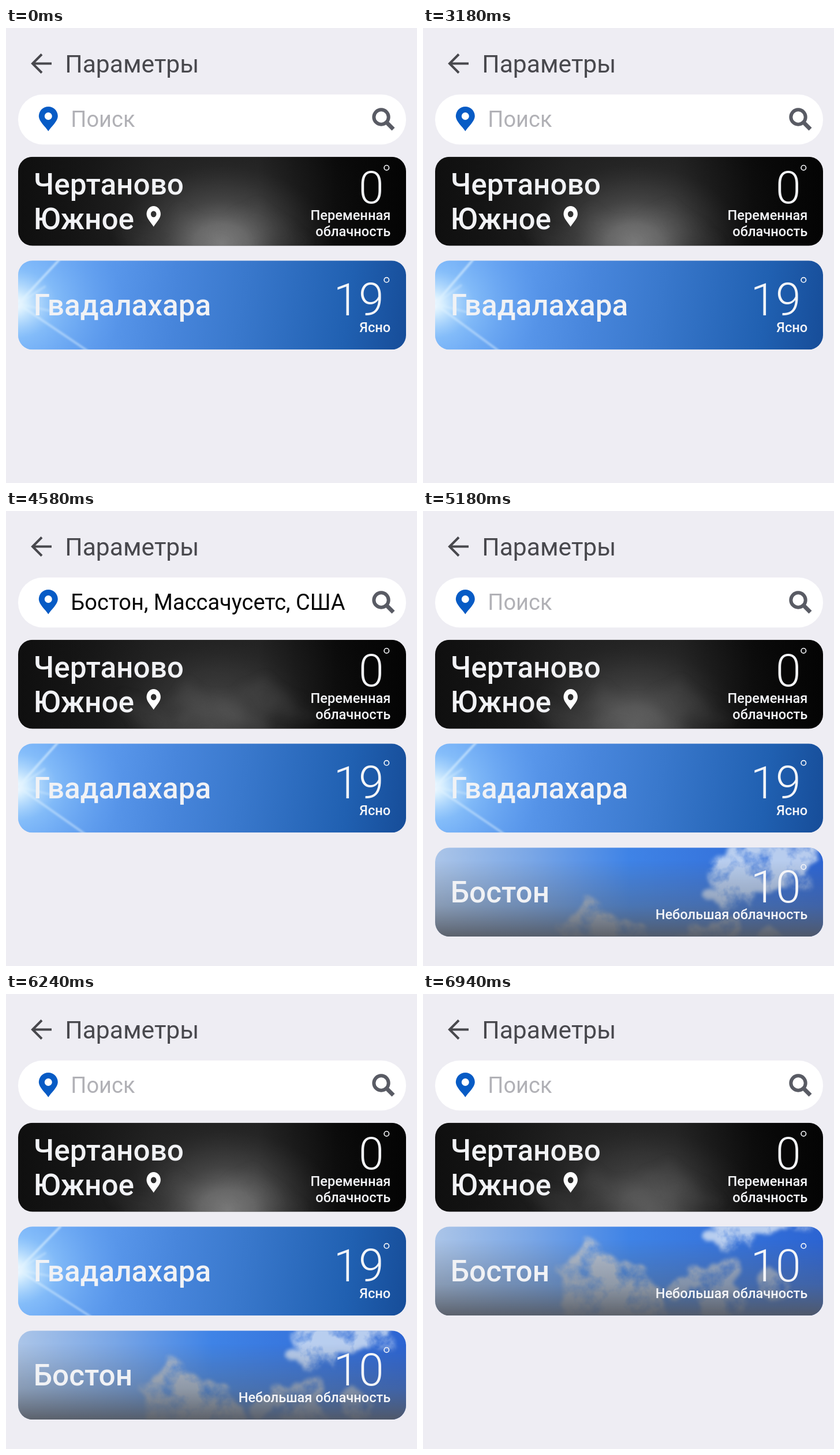
An HTML page that plays this animation: 712 by 787 pixels, repeating every 7000 ms.

```html
<!DOCTYPE html>
<html lang="ru">
<head>
<meta charset="utf-8">
<title>Параметры</title>
<style>
html, body { margin: 0; width: 100%; height: 100%; overflow: hidden; background: #eeedf3; }
svg { display: block; width: 100vw; height: 100vh; font-family: Roboto, "Noto Sans", sans-serif; }
.city { font-size: 51.2px; font-weight: 500; fill: #f1f2f5; }
.temp { font-size: 78.5px; font-weight: 300; fill: #f4f5f8; text-anchor: end; }
.sky { font-size: 23.6px; font-weight: 500; fill: #f4f5f8; text-anchor: end; }
.row { font-size: 32px; fill: #45454a; }
</style>
</head>
<body>
<svg viewBox="0 0 712 787" preserveAspectRatio="none">
  <defs>
    <clipPath id="cardClip"><rect width="672" height="154" rx="25"/></clipPath>
    <path id="pin" fill-rule="evenodd" d="M0 26C-5 18-16.5 9-16.5 0a16.5 16.5 0 0 1 33 0C16.5 9 5 18 0 26ZM0-6.5a6.5 6.5 0 1 0 0 13a6.5 6.5 0 1 0 0-13Z"/>
    <linearGradient id="night">
      <stop offset="0" stop-color="#0f0f0f"/><stop offset=".35" stop-color="#1d1d1d"/>
      <stop offset=".62" stop-color="#1e1e1e"/><stop offset=".82" stop-color="#0a0a0a"/><stop offset="1" stop-color="#040404"/>
    </linearGradient>
    <radialGradient id="moon">
      <stop offset="0" stop-color="#a0a0a0"/><stop offset=".25" stop-color="#8c8c8c" stop-opacity=".9"/>
      <stop offset=".55" stop-color="#6c6c6c" stop-opacity=".45"/><stop offset="1" stop-color="#444" stop-opacity="0"/>
    </radialGradient>
    <linearGradient id="day" gradientUnits="userSpaceOnUse" x1="0" y1="20" x2="672" y2="110">
      <stop offset="0" stop-color="#6eabf7"/><stop offset=".25" stop-color="#5896ea"/><stop offset=".4" stop-color="#4886dc"/>
      <stop offset=".58" stop-color="#3978cc"/><stop offset=".85" stop-color="#2060b1"/><stop offset="1" stop-color="#174e9a"/>
    </linearGradient>
    <radialGradient id="sun">
      <stop offset="0" stop-color="#fff"/><stop offset=".12" stop-color="#dff4ff" stop-opacity=".9"/>
      <stop offset=".4" stop-color="#a3d6ff" stop-opacity=".45"/><stop offset="1" stop-color="#70adf8" stop-opacity="0"/>
    </radialGradient>
    <linearGradient id="azure">
      <stop offset="0" stop-color="#abc5e8"/><stop offset=".25" stop-color="#79a6e6"/>
      <stop offset=".5" stop-color="#3f83e6"/><stop offset="1" stop-color="#2c64d2"/>
    </linearGradient>
    <linearGradient id="haze" x2="0" y2="1">
      <stop offset=".15" stop-color="#5a606b" stop-opacity="0"/><stop offset=".65" stop-color="#5a626e" stop-opacity=".42"/>
      <stop offset="1" stop-color="#53565d" stop-opacity=".9"/>
    </linearGradient>
    <filter id="fluff" filterUnits="userSpaceOnUse" x="150" y="-120" width="560" height="420" color-interpolation-filters="sRGB">
      <feTurbulence type="fractalNoise" baseFrequency=".024" numOctaves="5" seed="8" result="n"/>
      <feColorMatrix in="n" values="0 0 0 0 1  0 0 0 0 1  0 0 0 0 1  0 0 2.6 0 -.45" result="texture"/>
      <feDisplacementMap in="SourceGraphic" in2="n" scale="42" xChannelSelector="R" yChannelSelector="G"/>
      <feGaussianBlur stdDeviation="3"/>
      <feComposite in2="texture" operator="in"/>
    </filter>
    <filter id="smoke" filterUnits="userSpaceOnUse" x="100" y="0" width="500" height="230" color-interpolation-filters="sRGB">
      <feTurbulence type="fractalNoise" baseFrequency=".015 .03" numOctaves="3" seed="3" result="n"/>
      <feDisplacementMap in="SourceGraphic" in2="n" scale="90" xChannelSelector="R" yChannelSelector="G"/>
      <feGaussianBlur stdDeviation="9"/>
    </filter>
    <filter id="soft" filterUnits="userSpaceOnUse" x="-20" y="-20" width="240" height="200"><feGaussianBlur stdDeviation="1.5"/></filter>
  </defs>

  <rect width="712" height="787" fill="#eeedf3"/>
  <path d="M79 61.5H46M62 45.5L46 61.5L62 77.5" fill="none" stroke="#48484d" stroke-width="4"/>
  <text x="102.3" y="77" font-size="42.6" fill="#48484d">Параметры</text>

  <g id="cards">
    <g id="nightCard">
      <g clip-path="url(#cardClip)">
        <rect width="672" height="154" fill="url(#night)"/>
        <ellipse cx="350" cy="90" rx="270" ry="160" fill="url(#moon)" opacity=".16"/>
        <ellipse id="glow" cy="150" rx="190" ry="135" fill="url(#moon)"/>
        <g id="wisps" filter="url(#smoke)" fill="#777"></g>
      </g>
      <text class="city" x="26.8" y="65">Чертаново</text>
      <text class="city" x="26.8" y="125">Южное</text>
      <use href="#pin" fill="#fff" transform="translate(234.7 99.2) scale(.74 .84)"/>
    </g>
    <g id="sunCard">
      <g clip-path="url(#cardClip)">
        <rect width="672" height="154" fill="url(#day)"/>
        <ellipse cx="-8" cy="75" rx="190" ry="150" fill="url(#sun)"/>
        <g filter="url(#soft)"><g id="rays" stroke="#e2f3ff" stroke-linecap="round"></g></g>
      </g>
      <text class="city" x="26.8" y="95">Гвадалахара</text>
    </g>
    <g id="cloudCard">
      <g clip-path="url(#cardClip)">
        <rect width="672" height="154" fill="url(#azure)"/>
        <g id="drift"><g id="clouds" filter="url(#fluff)"></g></g>
        <rect width="672" height="154" fill="url(#haze)"/>
      </g>
      <text class="city" x="26.8" y="95">Бостон</text>
    </g>
  </g>

  <g id="panel">
    <rect x="21" y="115" width="672" height="700" rx="43" fill="#fff"/>
    <g id="rows"></g>
  </g>
  <rect x="21" y="115" width="672" height="86.5" rx="43" fill="#fff"/>
  <use href="#pin" fill="#075bc5" transform="translate(73.3 152.5)"/>
  <text id="field" x="112.3" y="171" font-size="38"></text>
  <g fill="none" stroke="#595b64">
    <circle cx="650" cy="154" r="12.7" stroke-width="6"/>
    <path d="M659 163L671 175" stroke-width="7"/>
  </g>
</svg>
<script>
const LOOP = 7000;
const $ = id => document.getElementById(id);

function add(parent, tag, attrs, text = '') {
  const el = document.createElementNS('http://www.w3.org/2000/svg', tag);
  for (const key in attrs) el.setAttribute(key, attrs[key]);
  el.textContent = text;
  parent.append(el);
  return el;
}

function weather(card, degrees, lines) {
  const y = lines.length > 1 ? 80.5 : 95;
  add(card, 'text', { class: 'temp', x: 633.5, y }, degrees);
  add(card, 'circle', { cx: 638.3, cy: y - 61.5, r: 4.2, fill: 'none', stroke: '#f4f5f8', 'stroke-width': 1.7 });
  lines.forEach((line, i) => add(card, 'text', { class: 'sky', x: 645.3, y: y + 29 + i * 28 }, line));
}

function puffs(opacity, fill, list) {
  const group = add($('clouds'), 'g', { opacity, fill });
  for (const [cx, cy, r] of list) add(group, 'circle', { cx, cy, r });
}

weather($('nightCard'), '0', ['Переменная', 'облачность']);
weather($('sunCard'), '19', ['Ясно']);
weather($('cloudCard'), '10', ['Небольшая облачность']);

puffs(.95, '#bcc4d0', [[264, 76, 24], [243, 102, 27], [288, 94, 28], [322, 114, 28], [354, 123, 24], [285, 150, 65], [350, 165, 45]]);
puffs(.85, '#b3bfd0', [[448, 111, 20], [480, 115, 22], [422, 133, 18], [508, 102, 20], [500, 155, 40], [585, 130, 24]]);
puffs(.85, '#d0def2', [[500, 5, 30], [508, 46, 22], [480, 50, 15], [540, 10, 34], [545, 44, 20], [585, 4, 34], [622, 0, 30], [560, -35, 50], [640, -30, 30]]);

for (let i = 0; i < 7; i++) {
  add($('wisps'), 'ellipse', { cx: 210 + i * 42, cy: 125 + 24 * Math.sin(i * 2.1), rx: 42, ry: 17, opacity: .35 });
}

// Each ray: angle in degrees, length, opacity
const rays = [[-47, 105, .6], [-33, 55, .3], [34, 150, .45], [12, 60, .3]].map(([angle, length, opacity]) => ({
  angle, el: add($('rays'), 'path', { d: `M0 0H${length}`, opacity, 'stroke-width': 4 })
}));

['Бостон, Массачусетс, США', 'Бостон, Линкольншир, Англия', 'Бостон, Джорджия, США', 'Бостон, Вирджиния, США', 'Бостон, Нью-Йорк, США']
  .forEach((name, i) => add($('rows'), 'text', { class: 'row', x: 113, y: 266 + i * 100 }, name));

const clamp = x => Math.min(1, Math.max(0, x));
const ease = (t, from, to) => {
  const x = clamp((t - from) / (to - from));
  return x * x * (3 - 2 * x);
};
const show = (el, on) => el.setAttribute('display', on ? 'inline' : 'none');

function place(el, y, scale = 1) {
  el.setAttribute('transform', `translate(357 ${y + 77}) scale(${scale}) translate(-336 -77)`);
}

function fieldText(t) {
  if (t < 3440 || t >= 4900) return '';
  if (t >= 4400) return 'Бостон, Массачусетс, США';
  return 'Бостон'.slice(0, 1 + Math.floor((t - 3440) / 140));
}

function render(t) {
  const query = fieldText(t);
  $('field').textContent = query || 'Поиск';
  $('field').setAttribute('fill', query ? '#050505' : '#b1b1b6');
  show($('panel'), t >= 3520 && t < 4400);
  show($('rows'), t >= 3700);

  const bright = .5 + .5 * Math.cos(t / 3000 * 2 * Math.PI);
  $('glow').setAttribute('cx', 352 + 18 * Math.sin(t / 900));
  $('glow').setAttribute('opacity', .25 + .45 * bright);
  $('wisps').setAttribute('transform', `translate(${12 * Math.sin(t / 600)} ${10 - 14 * (1 - bright)})`);
  $('wisps').setAttribute('opacity', .45 - .25 * bright);

  const sway = 2.5 * Math.sin(t / 1700);
  for (const ray of rays) {
    ray.el.setAttribute('transform', `translate(0 75) rotate(${ray.angle + Math.sign(ray.angle) * sway})`);
  }
  $('drift').setAttribute('transform', `translate(0 ${(6240 - t) * .037})`);

  place($('nightCard'), 222.7);
  place($('sunCard'), 402.3, 1 + .015 * ease(t, 6300, 6450));
  $('sunCard').setAttribute('opacity', 1 - ease(t, 6540, 6660));
  show($('sunCard'), t < 6660);

  place($('cloudCard'), 582.2 - 179.9 * ease(t, 6600, 6820));
  $('cloudCard').setAttribute('opacity', ease(t, 4900, 5050));
  show($('cloudCard'), t >= 4900);
}

const start = performance.now();
function tick() {
  render((performance.now() - start) % LOOP);
  requestAnimationFrame(tick);
}
tick();
</script>
</body>
</html>
```
